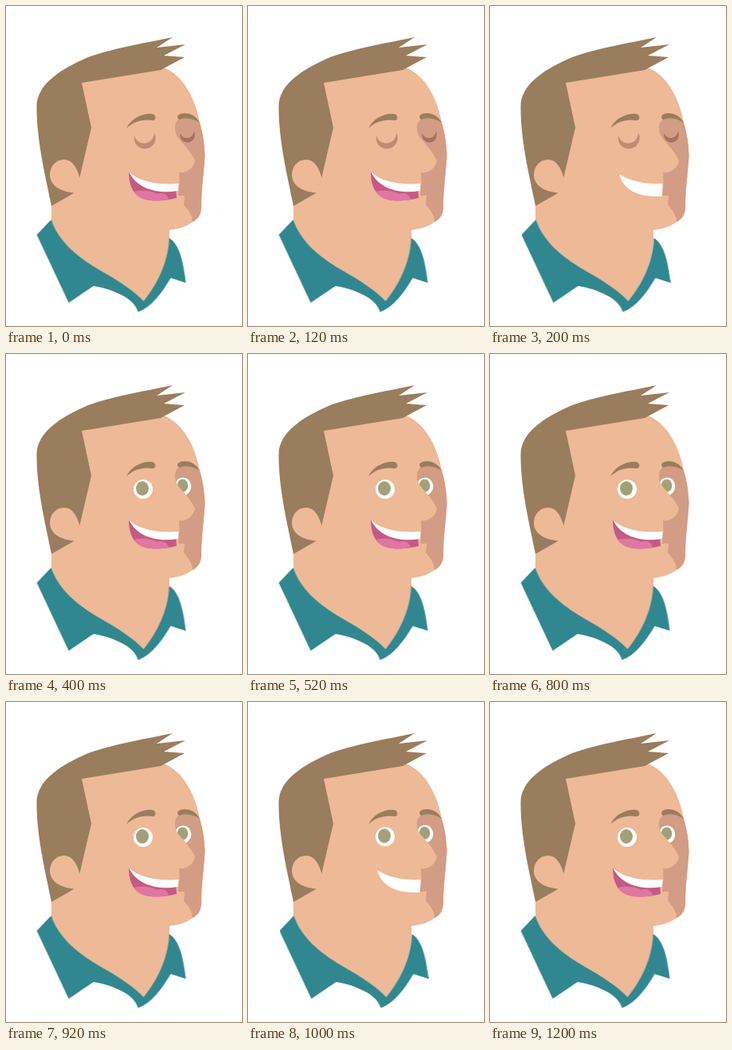
An HTML page that plays this animation: 296x400 px, repeating every 1.4 s.

```html
<!DOCTYPE html>
<html lang="en">
<head>
<meta charset="utf-8">
<title>Laughing man</title>
<style>
  html, body { margin: 0; width: 100%; height: 100%; overflow: hidden; background: #fff; }
  svg { display: block; width: 100%; height: 100%; }
  .skin { fill: #eeb997; }
  .hair { fill: #9a7d5c; }
  .shirt { fill: #30878f; }
  .shade { fill: #d39c84; }
  .white { fill: #fff; }
  .iris { fill: #a3a079; }

  .laugh, .smile, .open, .shut, .shirt, .ball { animation: 1400ms step-end infinite; }
  .laugh { animation-name: laugh; }
  .smile { animation-name: smile; }
  .open { animation-name: open; }
  .shut { animation-name: shut; }
  .shirt { animation-name: nudge; }
  .ball { animation-name: lift; }

  @keyframes laugh {
    0%, 28.5714%, 57.1428%, 85.7142%, 100% { opacity: 1; }
    14.2857%, 42.8571%, 71.4285% { opacity: 0; }
  }
  @keyframes smile {
    0%, 28.5714%, 57.1428%, 85.7142%, 100% { opacity: 0; }
    14.2857%, 42.8571%, 71.4285% { opacity: 1; }
  }
  @keyframes open {
    0% { opacity: 0; }
    28.5714%, 100% { opacity: 1; }
  }
  @keyframes shut {
    0% { opacity: 1; }
    28.5714%, 100% { opacity: 0; }
  }
  @keyframes nudge {
    0%, 28.5714%, 57.1428%, 85.7142%, 100% { transform: translate(-.4px, 0); }
    14.2857%, 42.8571%, 71.4285% { transform: translate(.5px, 0); }
  }
  @keyframes lift {
    0%, 28.5714%, 57.1428%, 85.7142%, 100% { transform: none; }
    14.2857%, 42.8571%, 71.4285% { transform: translate(0, -.7px); }
  }
</style>
</head>
<body>
<svg viewBox="0 0 296 400">
  <defs>
    <path id="side" d="M243 146C236 138 222 138 216 142C210 148 211 157 216 165C222 172 228 178 233 186L237 193C236 202 226 210 217 208L217.500 222L216 237L224 237L223 248C227 254 234 260 234 270C241 266 245 261 245 250C245 230 248 210 249.500 187C249 170 246 155 243 146Z"/>
    <clipPath id="far"><use href="#side"/></clipPath>
  </defs>

  <!-- neck and face -->
  <path class="skin" d="M90 90L194 76L198 77C223 87 238 117 243 146C246 155 249 170 249.500 187C248 210 245 230 245 250C245 261 241 266 234 270C226 276 216 279 205 280L205 292C204 320 190 348 173 372C140 360 80 340 57 270L57 245Z"/>
  <use class="shade" href="#side"/>

  <path class="shirt" d="M57 267C66 294 89 313 116 329C142 344 160 355 173 369C190 348 204 320 205 290C219 298 223 323 226 346L207 340C195 360 183 376 166 382.500C161 365 135 354 110 350L79 371L39 286Z"/>

  <path class="hair" d="M209 39C170 47 130 54 103 64C70 78 37.500 98 38.500 127C38.500 170 50 215 57 250L85 234L92 216L107 152L95 96L194 80L224 64L198 62L225 48L189 52Z"/>
  <path class="skin" d="M92.500 215C89 202 83 192 73 192C62 192 55 201 55 211C55 223 66 232 86 233.500Z"/>

  <!-- eyes -->
  <g class="shut">
    <path fill="#c18b71" d="M161 162A13.500 13.500 0 1 0 186 158.500A12.700 12.700 0 0 1 161 162Z"/>
    <path fill="#a9705f" d="M218.500 159A9.300 9.300 0 1 0 235.500 156.500A8.700 8.700 0 0 1 218.500 159Z"/>
  </g>
  <g class="open">
    <g class="ball">
      <circle class="white" cx="172" cy="169" r="12"/>
      <ellipse class="iris" cx="171" cy="168" rx="8" ry="9"/>
    </g>
    <g clip-path="url(#far)">
      <g class="ball">
        <ellipse class="white" cx="222" cy="165.500" rx="10.300" ry="11"/>
        <ellipse class="iris" cx="221.500" cy="164.500" rx="6.800" ry="8"/>
      </g>
    </g>
  </g>

  <!-- brows -->
  <path class="hair" d="M151 153C156 141 172 133 184 135C189 137 188 143 184 143C172 141 160 144 151 153Z"/>
  <path class="hair" d="M216 141C213 137 218 134 224 134C232 134 239 138 243 146C236 141 227 139 220 141C218 142 217 142 216 141Z"/>

  <!-- mouth -->
  <g class="laugh">
    <path fill="#c45a84" d="M154 207C154 229 163 241 181 243C194 244 206 242 214 240L213 228C190 230 165 222 154 207Z"/>
    <path fill="#de77a2" d="M160 232C170 230 181 230 189 235C197 232 203 236 204 242C196 243.500 188 244 181 243C171 242 164 238 160 232Z"/>
    <path class="white" d="M154 207C165 219 190 224 216.500 222L215.500 231C192 235 165 230 154 207Z"/>
  </g>
  <path class="white smile" d="M162 210C175 219 195 223 216.500 222L215.500 238C190 239 168 233 162 210Z"/>
</svg>
</body>
</html>
```
